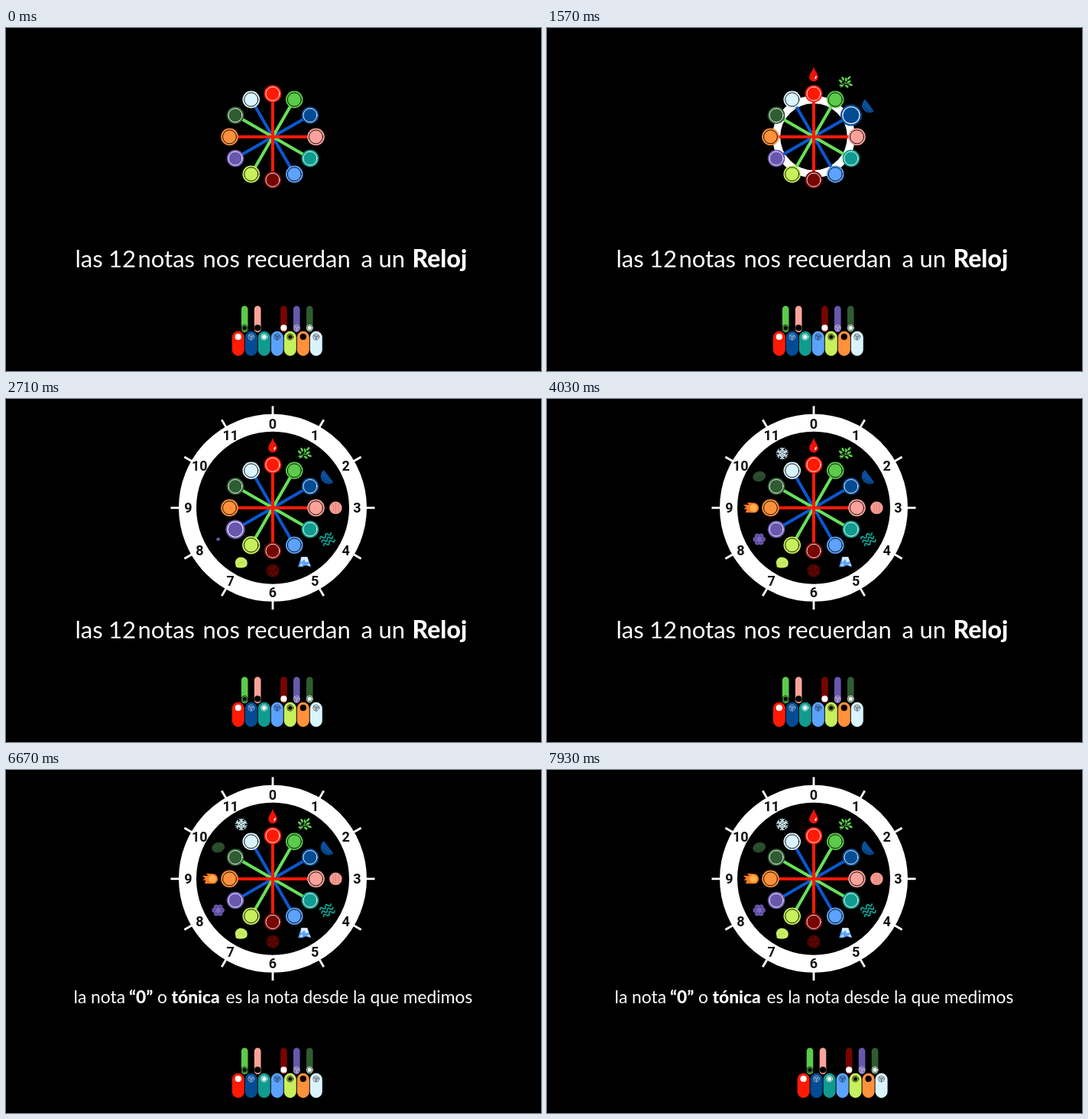
Animation of 700 by 450 pixels, one loop 7.99 s. Source, as an HTML page:

```html
<!DOCTYPE html>
<html lang="es">
<head>
<meta charset="utf-8">
<title>Reloj de notas</title>
<style>
html, body { margin: 0; width: 100%; height: 100%; overflow: hidden; background: #000; }
svg { display: block; width: 100%; height: 100%; }
.caption { font-family: Lato, "Open Sans", sans-serif; fill: #fff; }
.caption .bold { font-weight: 800; }
.hours { font: 700 18px Roboto, Arial, sans-serif; text-anchor: middle; fill: #111; }
</style>
</head>
<body>
<svg viewBox="0 0 700 450">
  <g transform="translate(349 142.8)">
    <g id="dial"></g>
    <g id="spokes" stroke-width="4"></g>
    <g id="nodes"></g>
    <g id="icons"></g>
  </g>
  <text id="before" class="caption" y="314" font-size="31"><tspan x="90.5">las</tspan> <tspan x="134">12</tspan> <tspan x="172.5">notas</tspan> <tspan x="257.5">nos</tspan> <tspan x="314.5">recuerdan</tspan> <tspan x="464.5">a</tspan> <tspan x="487.5">un</tspan> <tspan class="bold" x="531.5" font-size="32">Reloj</tspan></text>
  <text id="after" class="caption" y="305.5" font-size="22.8"><tspan x="88.5">la nota</tspan> <tspan class="bold" x="161">“0”</tspan><tspan x="198">o</tspan> <tspan class="bold" x="216.5">tónica</tspan> <tspan x="287.5">es la nota desde la que medimos</tspan></text>
  <g id="keyboard"></g>
</svg>
<script>
const LOOP = 7990, STEP = 60;
const NODE_RADIUS = 56.5, ICON_RADIUS = 82.4;
const colors = ['#ff1a05', '#5bcb4b', '#034b93', '#fba39b', '#109b8e', '#5ca2ff',
                '#760500', '#c6f05c', '#6957ae', '#ff913c', '#2f5c31', '#daf4ff'];
const spokeColors = ['#ff1a05', '#68e05a', '#0b57cf'];
const $ = id => document.getElementById(id);
const polar = (i, r) => [r * Math.sin(i * Math.PI / 6), -r * Math.cos(i * Math.PI / 6)];
const range = n => [...Array(n).keys()];
const circle = (x, y, r, attrs = '') => `<circle cx="${x}" cy="${y}" r="${r}" ${attrs}/>`;
const ellipse = (x, y, rx, ry, turn, attrs = '') =>
  `<ellipse rx="${rx}" ry="${ry}" transform="translate(${x} ${y}) rotate(${turn})" ${attrs}/>`;
const path = (d, attrs) => `<path d="${d}" ${attrs}/>`;
const stroke = (color, width) => `fill="none" stroke="${color}" stroke-width="${width}" stroke-linecap="round"`;
const inkOf = i => i % 2 ? '#000' : '#fff';

// Dial: white band, hour ticks and numbers
$('dial').innerHTML = circle(0, 0, 111.5, 'fill="none" stroke="#fff" stroke-width="23"') +
  range(12).map(i => {
    const [x, y] = polar(i, 110.5);
    return `<path d="M0-122V-133.5" stroke="#fff" stroke-width="2.8" transform="rotate(${i * 30})"/>` +
      `<text class="hours" x="${x}" y="${y + 6.5}">${i}</text>`;
  }).join('');

$('spokes').innerHTML = [2, 5, 1, 4, 0, 3].map(i =>
  `<path d="M0-${NODE_RADIUS}V${NODE_RADIUS}" stroke="${spokeColors[i % 3]}" transform="rotate(${i * 30})"/>`).join('');

$('nodes').innerHTML = colors.map((color, i) =>
  `<g>${circle(0, 0, 11.3, `fill="${color}"`)}${circle(0, 0, 9, stroke(inkOf(i), .9))}</g>`).join('');

const wave = y => `M-8 ${y}q2-4 4 0t4 0t4 0t4 0`;
const icons = [
  path('M0-10C1-4 5.8-1 5.8 4A5.8 5.8 0 0 1-5.8 4C-5.8-1-1-4 0-10Z', 'fill="#f01208"') +
    ellipse(2.6, 4.5, 1, 2.2, 25, 'fill="#fff"'),
  path('M-6 7Q-1 3 4-6M-2 3L-7-1M0 1L7 2', stroke('#5bcb4b', 1)) +
    [[-6, -2, 30], [-3, -5, 60], [1, -4, 80], [5, -6, -50], [5, -1, -20], [7, 3, 20], [2, 5, 40], [-5, 4, 10]]
      .map(([x, y, turn]) => ellipse(x, y, 2.8, 1.4, turn, 'fill="#5bcb4b"')).join(''),
  path('M-4.5-8.5A10 10 0 0 0 8 8Z', 'fill="#0a4f9c"') +
    path('M-7 1Q-3 6 8 8A10 10 0 0 1-7 1Z', 'fill="#08427f"'),
  circle(0, 0, 8.3, 'fill="#f59b92"') +
    path('M-4-6Q-1 0-4 6M0-7V7M4-6Q2 0 4 6', stroke('#d8786f', .7)),
  `<g transform="rotate(-28)">${path(wave(-5) + wave(0) + wave(5), stroke('#109b8e', 1.9))}</g>`,
  path('M-8 6L-4-7L4-7L9 6L2 4L-3 6Z', 'fill="#5ca2ff"') +
    path('M-4-7L4-7L6-1L2 0L0-4L-4 0ZM-6 4L-2 1L-3 5ZM3 3L7 2L8 5Z', 'fill="#dceeff"'),
  circle(0, 0, 8.6, 'fill="#4b0400"') +
    path('M-5-3l3 1M1-6l3 2M-4 4l3-2M2 2l4 1M0 6l2-1M0-1l2-2', stroke('#760c06', 1.2)),
  path('M-8 0C-7-6-2-8 3-6C8-4 9 1 7 5C4 8-4 8-7 6Z', 'fill="#c9ed64"') +
    path('M-5 3Q-1-2 3 1', stroke('#abd047', .8)),
  range(6).map(i => circle(...polar(i * 2 + 1, 5), 3.2, 'fill="#6957ae"')).join('') +
    circle(0, 0, 3, 'fill="#7c69c0"') +
    range(6).map(i => circle(...polar(i * 2 + 1, 5), 1, 'fill="#4b3b8b"')).join(''),
  path('M4-6.5L-5-7L-2-4L-10-4L-6-1L-9 2L-5 2L-7 6L4 6.5A6.5 6.5 0 0 0 4-6.5Z', 'fill="#ff7c25"') +
    circle(3.5, 0, 4.8, 'fill="#ffb04e"'),
  ellipse(0, 0, 8.6, 6.6, -15, 'fill="#294b2b"') +
    path('M-4 0Q0-4 5-3', stroke('#3c643d', .8)),
  range(6).map(i => `<g transform="rotate(${i * 60})">${
    path('M0 0V-7.5M-2.5-7L0-4.8L2.5-7M-2-4L0-2.4L2-4', stroke('#daf4ff', 1.2))}</g>`).join('')
];
$('icons').innerHTML = icons.map(icon => `<g>${icon}</g>`).join('');

// Keyboard: each key carries one of three marks
function mark(i, x, y) {
  const ink = inkOf(i);
  if (i % 3 === 0) return circle(x, y, 4.1, `fill="${ink}"`);
  const ring = circle(x, y, 4, stroke(ink, .8));
  if (i % 3 === 1) return ring + circle(x, y, 2.6, `fill="${ink}"`);
  return `<g opacity=".65">${ring}${path(`M${x - 3} ${y - 2}L${x} ${y}L${x + 3} ${y - 2}M${x} ${y}V${y + 4}`, stroke(ink, .9))}${
    circle(x, y, 2, stroke(ink, .6))}</g>`;
}
const key = (i, x, y, w, h, markY) =>
  `<rect x="${x - w / 2}" y="${y}" width="${w}" height="${h}" rx="${w / 2}" fill="${colors[i]}"/>` + mark(i, x, markY);
$('keyboard').innerHTML =
  [0, 2, 4, 5, 7, 9, 11].map((note, k) => key(note, 303.8 + 17 * k, 397.8, 16, 32.4, 405.2)).join('') +
  [[1, 312.2], [3, 329.2], [6, 363.4], [8, 380.3], [10, 397.3]].map(([note, x]) =>
    key(note, x, 364.6, 8.6, 34.6, 393.4)).join('');

const clamp = v => Math.min(1, Math.max(0, v));
const ease = (t, start, duration) => (1 - Math.cos(Math.PI * clamp((t - start) / duration))) / 2;
const place = (element, [x, y], scale) =>
  element.setAttribute('transform', `translate(${x} ${y}) scale(${scale})`);

function draw(t) {
  place($('dial'), [0, 0], ease(t, 1079, 1067));
  for (let i = 0; i < 12; i++) {
    const start = 1100 + i * 197;
    const pulse = Math.sin(Math.PI * clamp((t - start) / 240));
    place($('nodes').children[i], polar(i, NODE_RADIUS), 1 + .28 * pulse);
    place($('icons').children[i], polar(i, ICON_RADIUS), ease(t, start, 90));
  }
  const fade = ease(t, 5960, 700);
  $('before').setAttribute('opacity', 1 - fade);
  $('after').setAttribute('opacity', fade);
  place($('keyboard'), [44 * ease(t, 7240, 1067), 0], 1);
}

function tick() {
  const t = performance.now() % LOOP;
  draw(Math.floor((t - 10) / STEP) * STEP + 10);
  requestAnimationFrame(tick);
}
tick();
</script>
</body>
</html>
```
